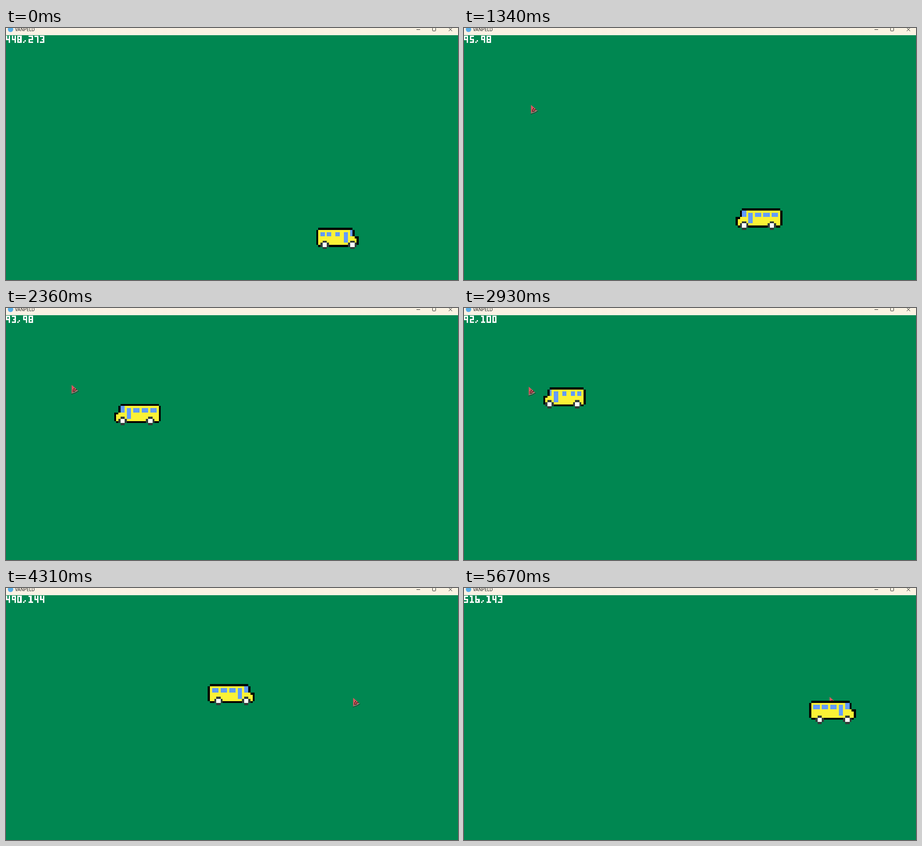
Animation, 1002 px wide and 559 px high, one loop 5.7 s. Source, as an HTML page with a canvas:

```html
<!DOCTYPE html>
<html lang="en">
<head>
<meta charset="utf-8">
<title>VANPELD</title>
<style>
  html, body { margin: 0; width: 100%; height: 100%; overflow: hidden; background: #008751; }
  canvas { display: block; }
  #bar { position: absolute; left: 0; top: 0; width: 1002px; height: 15.5px; overflow: hidden;
         background: linear-gradient(90deg, #faf1e4, #faf3e3); }
  #bar i { position: absolute; left: 4px; top: -3px; width: 12px; height: 12px; border-radius: 50%; background: #58ade6; }
  #bar span { position: absolute; left: 20px; top: -4px; font: 10px/15px "Noto Sans", "Open Sans", sans-serif; color: #222; }
  #bar svg { position: absolute; left: 0; top: 0; fill: none; stroke: #222; }
</style>
</head>
<body>
<canvas id="stage" width="1002" height="559"></canvas>
<div id="bar">
  <i></i><span>VANPELD</span>
  <svg width="1002" height="16">
    <path d="M910 3.5h8M981.5 -.5l7.5 7.5M989 -.5l-7.5 7.5"/>
    <rect x="945.5" y="-.5" width="7" height="7" rx="1"/>
  </svg>
</div>
<script>
const ctx = document.getElementById('stage').getContext('2d');
const LOOP = 5700;
const UNIT = 1.572;        // screen pixels per game unit
const CELL = UNIT * 3;     // one bus pixel
const DOT = UNIT * 2;      // one text pixel
const STEP = 60.5;         // time per sprite pose
const TURN_LEFT = 1095, STOP_LEFT = 2550, TURN_RIGHT = 3700, STOP_RIGHT = 5010;

const YELLOW = '#fbf236', BLUE = '#639bff', GREY = '#323c39';

// time, then x and y in game units
const mousePath = [
  [150, 448, 273], [720, 146, 119], [1000, 97, 99], [1750, 93, 97],
  [2330, 93, 98], [2930, 92, 100], [3020, 92, 100], [3500, 492, 147],
  [3890, 486, 147], [4710, 494, 142], [4800, 494, 142], [5200, 516, 143]
];
// time, then left edge and ground line on screen
const busPath = [
  [TURN_LEFT, 683, 490.4], [1160, 661, 478], [1750, 469, 379], [1860, 430, 358.6],
  [2330, 251, 266], [STOP_LEFT, 170.8, 223], [TURN_RIGHT, 170.8, 223],
  [3890, 257, 235.7], [4710, 628, 283.4], [STOP_RIGHT, 765, 301.9]
];

// Body edges in cells, window width, wheel drop
const normal = { l: 0, t: 0, r: 21, b: 8, pane: 3, drop: 0 };
const small = { l: 1, t: 1, r: 20, b: 9, pane: 2, drop: 0 };
const tall = { l: 0, t: -1, r: 22, b: 7, pane: 3, drop: 0 };
const low = { ...normal, t: 1, b: 9 };
const dropped = { ...low, drop: 1 };
const idlePoses = [small, normal, tall, normal];
const drivePoses = [dropped, dropped, low, low];

// Five octal rows of three bits per glyph
const glyphs = {
  0: '75557', 1: '62227', 2: '71747', 3: '71317', 4: '55711', 5: '74717',
  6: '44757', 7: '71111', 8: '75757', 9: '75711', ',': '00024'
};

const smooth = k => k * k * (3 - 2 * k);

function along(path, t, ease = k => k) {
  const next = path.findIndex(p => p[0] > t);
  if (next === 0) return path[0].slice(1);
  if (next < 0) return path[path.length - 1].slice(1);
  const a = path[next - 1], b = path[next];
  const k = ease((t - a[0]) / (b[0] - a[0]));
  return [a[1] + (b[1] - a[1]) * k, a[2] + (b[2] - a[2]) * k];
}

// Fill between rounded edges so neighbouring pixels meet exactly
function box(x0, y0, x1, y1, color) {
  const x = Math.round(x0), y = Math.round(y0);
  ctx.fillStyle = color;
  ctx.fillRect(x, y, Math.round(x1) - x, Math.round(y1) - y);
}

function drawBus(left, ground, flipped, { l, t, r, b, pane, drop }) {
  const top = ground - 11 * CELL;
  const cells = (c0, r0, c1, r1, color) => {
    const [a, z] = flipped ? [21 - c1, 21 - c0] : [c0, c1];
    box(left + a * CELL, top + r0 * CELL, left + (z + 1) * CELL, top + (r1 + 1) * CELL, color);
  };
  cells(l + 1, t, r - 3, t, '#000');
  cells(l, t + 1, l, b - 1, '#000');
  cells(r - 2, t + 1, r - 2, t + 3, '#000');
  cells(r - 1, t + 4, r, t + 4, '#000');
  cells(r, t + 5, r, b - 1, '#000');
  cells(l + 1, b, r - 1, b, '#000');

  cells(l + 1, t + 1, r - 3, b - 1, YELLOW);
  cells(r - 2, t + 4, r - 2, b - 1, YELLOW);
  cells(r - 1, t + 5, r - 1, b - 1, YELLOW);

  for (const c of [l + 2, 6, 10]) cells(c, t + 2, c + pane - 1, t + 3, BLUE);
  cells(14, t + 2, 15, t + 6, BLUE);
  cells(17, t + 1, r - 3, t + 3, BLUE);

  for (const c of [4, 17]) {
    cells(c, 7 + drop, c + 1, 10, GREY);
    cells(c - 1, 8 + drop, c + 2, 9 + drop, GREY);
    cells(c, 8 + drop, c + 1, 9 + drop, '#fff');
  }
}

function drawCursor(x, y) {
  ctx.save();
  ctx.translate(Math.round(x), Math.round(y));
  ctx.fillStyle = '#d9575f';
  ctx.strokeStyle = '#1d1a1a';
  ctx.lineWidth = 1;
  ctx.beginPath();
  ctx.moveTo(.5, .5);
  ctx.lineTo(15, 13.5);
  ctx.quadraticCurveTo(9, 19, .5, 21);
  ctx.closePath();
  ctx.fill();
  ctx.save();
  ctx.clip();
  ctx.strokeStyle = '#6d8a72';
  ctx.lineWidth = 6;
  ctx.beginPath();
  ctx.moveTo(16, 14);
  ctx.quadraticCurveTo(9, 19, 0, 21);
  ctx.stroke();
  ctx.restore();
  ctx.stroke();
  for (const [sx, sy] of [[5, 8], [3, 11], [7, 11], [10, 10], [3, 14], [6, 14]])
    box(sx, sy, sx + 2, sy + 2, '#1d1a1a');
  ctx.restore();
}

function drawText(text) {
  [...text].forEach((char, i) => {
    [...glyphs[char]].forEach((bits, row) => {
      for (let col = 0; col < 3; col++) {
        if (!(bits & (4 >> col))) continue;
        const x = (i * 4 + col) * DOT, y = 17.3 + row * DOT;
        box(x, y, x + DOT, y + DOT, '#fff');
      }
    });
  });
}

function draw(now) {
  const t = now % LOOP;
  box(0, 0, 1002, 559, '#008751');

  const [mx, my] = along(mousePath, t, smooth).map(Math.round);
  drawCursor(mx * UNIT - 1.5, my * UNIT + 16.4);

  const driving = (t >= TURN_LEFT && t < STOP_LEFT) || (t >= TURN_RIGHT && t < STOP_RIGHT);
  const poses = driving ? drivePoses : idlePoses;
  const flipped = t >= TURN_LEFT && t < TURN_RIGHT;
  const [left, ground] = along(busPath, t);
  drawBus(left, ground, flipped, poses[Math.floor(t / STEP) % 4]);

  drawText(mx + ',' + my);
}

const start = performance.now();
function tick() {
  draw(performance.now() - start);
  requestAnimationFrame(tick);
}
tick();
</script>
</body>
</html>
```
